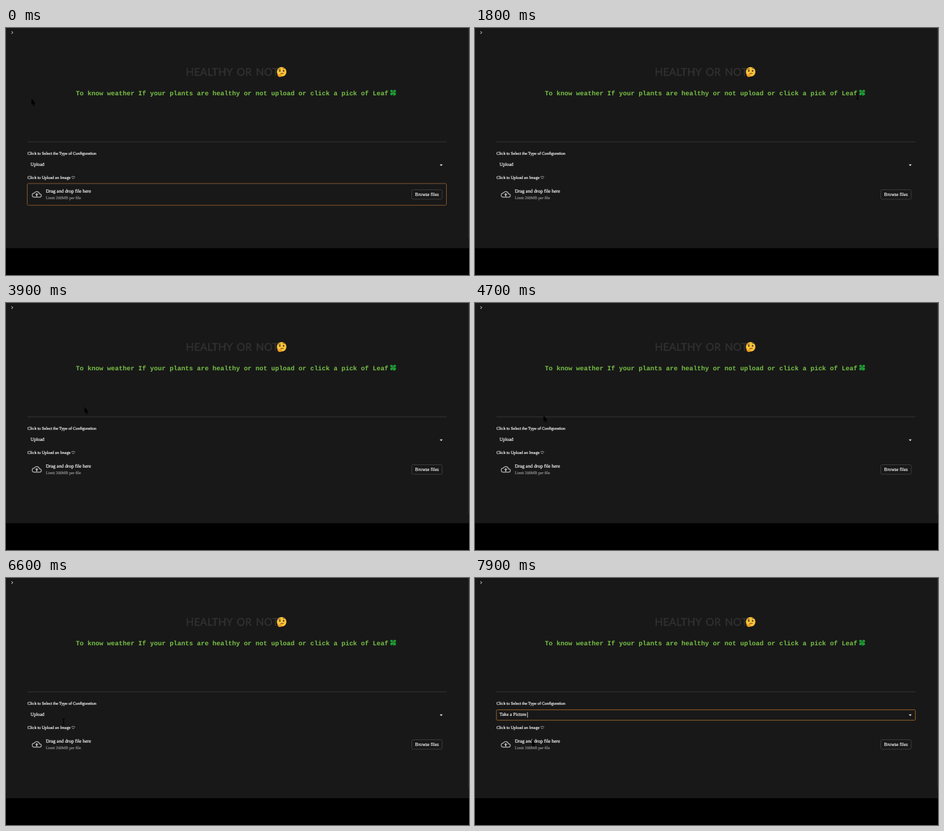
An HTML page that plays this animation: 708 px wide and 378 px high, repeating every 8 s.

```html
<!DOCTYPE html>
<html lang="en">
<head>
<meta charset="utf-8">
<title>Healthy or not</title>
<style>
  html, body { margin: 0; width: 708px; height: 378px; overflow: hidden; background: #000; }
  svg { display: block; }
  text { font-family: "Liberation Serif", serif; font-size: 7.2px; fill: #ececec;
         stroke: #ececec; stroke-width: .22px; text-rendering: geometricPrecision; }
  .title { font: 16px Lato, sans-serif; letter-spacing: .2px; word-spacing: 2px;
           fill: #303030; stroke: #303030; stroke-width: .5px; }
  .lead { font: bold 9.96px "Liberation Mono", monospace; fill: #78c046; stroke: none; }
  .label { font-size: 6.38px; }
  .drop { font-size: 7.4px; }
  .hint { font-size: 6.2px; fill: #8c8c8c; stroke: #8c8c8c; }
  .box { fill: none; stroke-width: 1px; }

  /* every change lands on a 100 ms tick */
  .anim { animation: 8s step-end -4ms infinite; }
  .uploadFocus { animation-name: uploadFocus; }
  .selectFocus { animation-name: selectFocus; }
  .list { animation-name: list; }
  .hover { animation-name: hover; }
  .before { animation-name: before; }
  .after { animation-name: after; }
  .arrow { animation-name: arrow; }
  .beam { animation-name: beam; }
  .cursor { animation-name: cursor; }

  @keyframes uploadFocus { 0% { opacity: 1 } 2.5% { opacity: .4 } 3.75%, 100% { opacity: 0 } }
  @keyframes selectFocus { 0% { opacity: 0 } 86.25% { opacity: .6 } 87.5%, 100% { opacity: 1 } }
  @keyframes list { 0% { opacity: 0 } 86.25% { opacity: 1 } 98.75%, 100% { opacity: 0 } }
  @keyframes hover { 0% { transform: none } 93.75%, 100% { transform: translateY(17px) } }
  @keyframes before { 0% { opacity: 1 } 98.75%, 100% { opacity: 0 } }
  @keyframes after { 0% { opacity: 0 } 98.75%, 100% { opacity: 1 } }
  @keyframes arrow {
    0%, 25%, 68.75%, 90%, 100% { opacity: 1 }
    22.5%, 65%, 81.25% { opacity: 0 }
  }
  @keyframes beam {
    0%, 25%, 68.75%, 90%, 100% { opacity: 0 }
    22.5%, 65%, 81.25% { opacity: 1 }
  }
  @keyframes cursor {
    0% { transform: translate(39px, 108px) }
    7.5% { transform: translate(39px, 108px); animation-timing-function: steps(2) }
    10% { transform: translate(164px, 266px) }
    11.25% { transform: translate(254px, 290px) }
    16.25% { transform: translate(254px, 290px); animation-timing-function: steps(2) }
    18.75% { transform: translate(497px, 175px) }
    20% { transform: translate(575px, 114px) }
    22.5% { transform: translate(585px, 99px); animation-timing-function: steps(8) }
    32.5% { transform: translate(236px, -14px) }
    37.5% { transform: translate(232px, 4px); animation-timing-function: steps(2) }
    40% { transform: translate(219px, 40px) }
    42.5% { transform: translate(219px, 40px); animation-timing-function: steps(3) }
    46.25% { transform: translate(24px, 183px); animation-timing-function: steps(2) }
    48.75% { transform: translate(120px, 159px); animation-timing-function: steps(3) }
    52.5% { transform: translate(114px, 159px) }
    56.25% { transform: translate(114px, 159px); animation-timing-function: steps(9) }
    67.5% { transform: translate(72px, 217px) }
    68.75% { transform: translate(72px, 217px); animation-timing-function: steps(5) }
    75% { transform: translate(98px, 257px) }
    77.5% { transform: translate(98px, 257px); animation-timing-function: steps(4) }
    82.5% { transform: translate(88px, 215px) }
    90% { transform: translate(88px, 215px); animation-timing-function: steps(5) }
    96.25%, 100% { transform: translate(87px, 247px) }
  }
</style>
</head>
<body>
<svg width="708" height="378" viewBox="0 0 708 378">
  <rect width="708" height="337" fill="#181818"/>
  <rect x="707" width="1" height="322" fill="#2a2a2a"/>
  <path d="M8.4 5 10.4 7 8.4 9" fill="none" stroke="#e0e0e0"/>

  <text class="title" x="275" y="72.8">HEALTHY OR NOT</text>

  <!-- thinking face -->
  <g transform="translate(421.5 67)">
    <circle r="7.3" fill="#fbc53a"/>
    <path d="M-5.2-3.6Q-3.4-5-1.4-4M1.6-5.2Q3.6-6.4 5.2-4.6M-2 3Q.6 1.8 3 2.6" fill="none" stroke="#6b4420" stroke-width="1"/>
    <ellipse cx="-2.8" cy="-1.4" rx="1.1" ry="1.5" fill="#4a2f18"/>
    <ellipse cx="3" cy="-1.6" rx="1.1" ry="1.5" fill="#4a2f18"/>
    <path d="M-6.4 3.6Q-5.4 2-4.6 4.2L1.2 3.4Q2.6 4-.2 5.2Q.6 7.8-3 8Q-6.6 7.6-6.4 3.6Z" fill="#ee9b22"/>
  </g>

  <text class="lead" x="106.8" y="103">To know weather If your plants are healthy or not upload or click a pick of Leaf</text>

  <!-- clover -->
  <g transform="translate(592 98.8)" fill="#1f9c36">
    <circle cx="-2.4" cy="-2.3" r="2.1"/>
    <circle cx="2.4" cy="-2.3" r="2.1"/>
    <circle cx="-2.4" cy="2.1" r="2.1"/>
    <circle cx="2.4" cy="2.1" r="2.1"/>
    <path d="M-2-2 2 2M2-2-2 2M0 0Q.2 3 1.4 5" fill="none" stroke="#1f9c36" stroke-width="1.2"/>
  </g>

  <rect x="33" y="173.7" width="640.5" height="1" fill="#363636"/>

  <text class="label" x="32.8" y="194.1">Click to Select the Type of Configuration</text>
  <text class="anim before" x="37.5" y="211.4">Upload</text>
  <text class="anim after" x="37.5" y="211.4">Take a Picture</text>
  <path d="M663.2 208.8h4.6l-2.3 2.4z" fill="#ececec"/>

  <text class="label" x="32.8" y="231.2">Click to Upload an Image</text>
  <path d="M99.8 228.2Q102.8 225.6 105.8 228.2M101 229.8Q102.8 231 104.6 229.8" fill="none" stroke="#a8a8a8" stroke-width=".9"/>

  <g transform="translate(39.5 247) scale(.625)">
    <path d="M6 19H19a4 4 0 0 0 .4-8H18.6A6.7 6.7 0 0 0 6 9A5 5 0 0 0 6 19Z" fill="none" stroke="#b4b4b4" stroke-width="1.9"/>
    <path d="M10.5 17v-4H7.8L12 8.8 16.2 13h-2.7v4z" fill="#b4b4b4"/>
  </g>
  <text class="drop" x="61" y="252.2">Drag and drop file here</text>
  <text class="hint" x="61" y="262.4">Limit 200MB per file</text>
  <rect class="box" x="620.5" y="247.5" width="46.5" height="14.5" rx="1.8" stroke="#3a3a3a"/>
  <text x="625.6" y="256.6">Browse files</text>
  <rect class="box anim uploadFocus" x="32.5" y="238" width="641" height="33.3" rx="2" stroke="#805530"/>

  <g class="anim selectFocus">
    <rect class="box" x="32.8" y="201.7" width="640.5" height="16" rx="1.5" stroke="#94622c"/>
    <rect class="anim before" x="59.3" y="205.3" width=".8" height="8.4" fill="#ececec"/>
    <rect class="anim after" x="79.8" y="205.3" width=".8" height="8.4" fill="#ececec"/>
  </g>

  <g class="anim list">
    <rect x="33" y="220" width="640.5" height="36" rx="1.5" fill="#181818"/>
    <rect class="anim hover" x="33" y="221" width="640.5" height="17" fill="#242424"/>
    <text x="40" y="231.8">Upload</text>
    <text x="40" y="248.8">Take a Picture</text>
  </g>

  <g class="anim cursor">
    <path class="anim arrow" d="M0 0V9.6L2 8 3.6 11.6 5 11 3.6 7.4H6.2Z" fill="#000"/>
    <path class="anim beam" d="M-2 .5H2M0 .5V9.5M-2 9.5H2" fill="none" stroke="#000" stroke-width="1.1"/>
  </g>
</svg>
</body>
</html>
```
